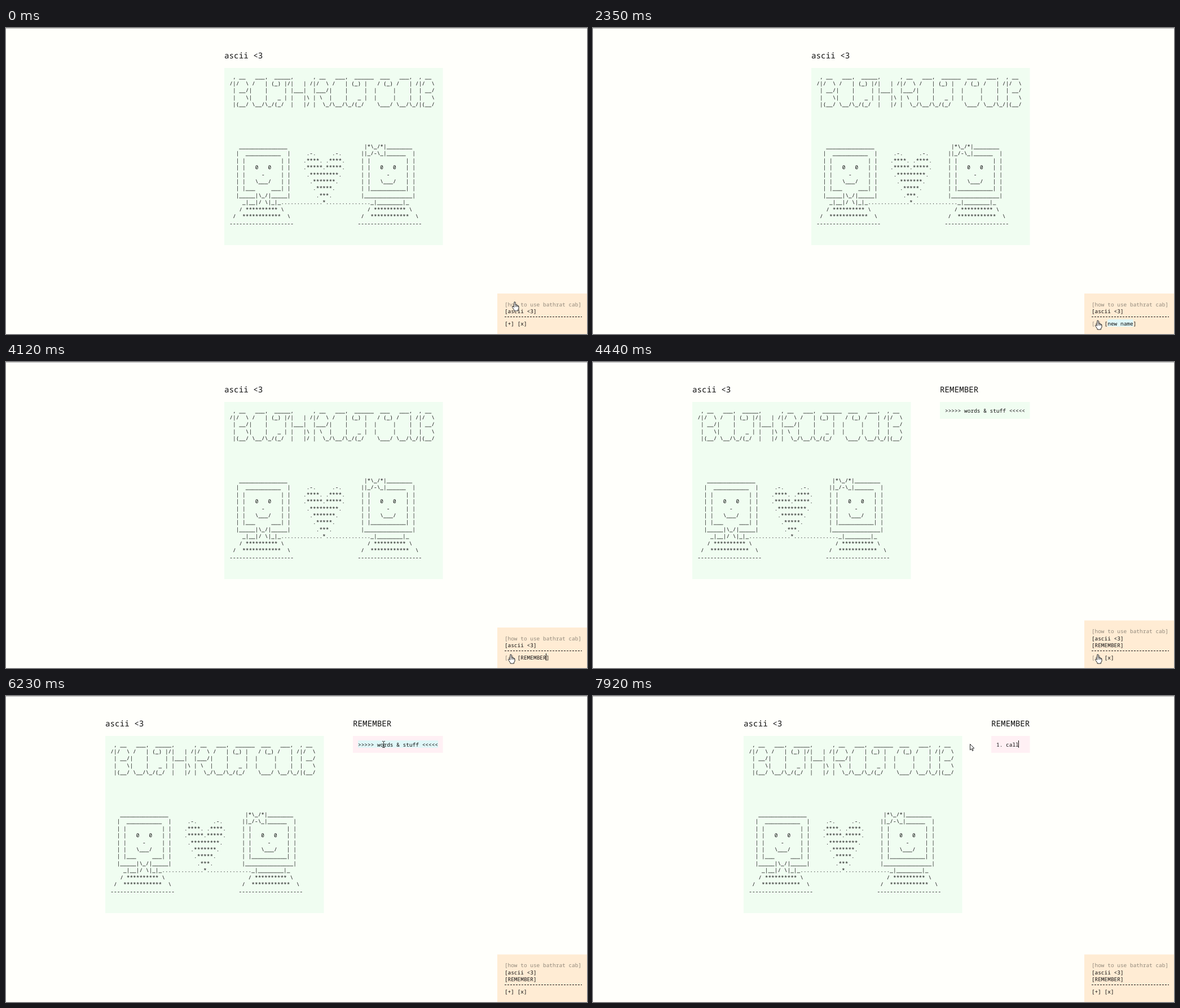
Animation, 1030 px wide and 544 px high, one loop 8000 ms. Source, as an HTML page with a canvas:

```html
<!DOCTYPE html>
<html lang="en">
<head>
<meta charset="utf-8">
<title>ascii notes</title>
<style>
html, body { margin: 0; width: 100%; height: 100%; overflow: hidden; background: #fffffb; }
canvas { display: block; }
</style>
</head>
<body>
<canvas id="stage" width="1030" height="544"></canvas>
<script>
const ctx = document.getElementById('stage').getContext('2d');
const LOOP = 8000, SIZE = 9.48, CH = 5.688, LINE = 12.43;
const FONT = '"Noto Sans Mono", "DejaVu Sans Mono", monospace';
const INK = '#111', DIM = '#938a7c', PAPER = '#fffffb', MINT = '#f0fdf1',
      BLUSH = '#fff0f4', SAND = '#ffecd4', PICKED = '#e0f7f8';

// Banner letters: five rows each, plus the step to the next letter
const LETTERS = {
  A: [7, '  ___,', ' /   |', '|    |', '|    |', ' \\__/\\_/'],
  B: [6, ' , __', '/|/  \\', ' | __/', ' |   \\', ' |(__/'],
  C: [6, '  ___', ' / (_)', '|', '|', ' \\___/'],
  H: [7, ' ,', '/|   |', ' |___|', ' |   |\\', ' |   |/'],
  R: [6, ' , __', '/|/  \\', ' |___/', ' | \\', ' |  \\_/'],
  T: [5, ' ______', '(_) |', '    |', '  _ |', ' (_/'],
  ' ': [2, '', '', '', '', '']
};

function banner(word) {
  const rows = Array.from({ length: 5 }, () => Array(66).fill(' '));
  let col = 0;
  for (const c of word) {
    const [step, ...shape] = LETTERS[c];
    shape.forEach((s, r) => [...s].forEach((g, i) => { if (g !== ' ') rows[r][col + i] = g; }));
    col += step;
  }
  return rows.map(r => r.join('').trimEnd());
}

const PICTURE = String.raw`
   _______________                        |*\_/*|________
  |  ___________  |     .-.     .-.      ||_/-\_|______  |
  | |           | |    .****. .****.     | |           | |
  | |   0   0   | |    .*****.*****.     | |   0   0   | |
  | |     -     | |     .*********.      | |     -     | |
  | |   \___/   | |      .*******.       | |   \___/   | |
  | |___     ___| |       .*****.        | |___________| |
  |_____|\_/|_____|        .***.         |_______________|
    _|__|/ \|_|_.............*.............._|________|_
   / ********** \                          / ********** \
 /  ************  \                      /  ************  \
--------------------                    --------------------`.split('\n').slice(1);
const ART = [...banner('BATHRAT CAB'), '', '', '', '', '', ...PICTURE];

const rect = (color, x, y, w, h) => { ctx.fillStyle = color; ctx.fillRect(x, y, w, h); };

function text(str, x, y, color = INK, size = SIZE) {
  ctx.font = size + 'px ' + FONT;
  ctx.fillStyle = color;
  ctx.fillText(str, x, y);
}

const caret = (x, y) => rect(INK, Math.round(x) - 1, y, 1, 13);
const typed = (str, times, t) => str.slice(0, times.filter(at => t >= at).length);

// Position along a line that advances in equal jumps from t0 to t1
function jump(t, t0, t1, steps, from, to) {
  const gap = (t1 - t0) / (steps - 1);
  const k = t < t0 ? 0 : Math.min(1, (Math.floor((t - t0) / gap + 0.001) + 1) / steps);
  return from.map((v, i) => Math.round(v + (to[i] - v) * k));
}

function outline(x, y, points) {
  ctx.beginPath();
  points.forEach(([px, py]) => ctx.lineTo(x + px, y + py));
  ctx.closePath();
  ctx.fillStyle = '#fff';
  ctx.fill();
  ctx.strokeStyle = '#222';
  ctx.lineWidth = 1;
  ctx.lineJoin = 'round';
  ctx.stroke();
}

function hand(x, y) {
  outline(x, y, [[-1, 0], [0.5, 0], [1.2, 1], [1.2, 5], [3, 5], [3.6, 6], [5.2, 6], [5.8, 7],
    [7, 7.4], [7, 12], [5.5, 14], [5.5, 16], [-1, 16], [-1, 14.5], [-4.5, 9.5], [-4.2, 8], [-2.8, 8], [-1.4, 9.5]]);
  rect('#222', x + 1, y + 5, 0.8, 4);
  rect('#222', x + 3.2, y + 6, 0.8, 3);
  rect('#222', x + 5.2, y + 7, 0.8, 2);
}

const arrow = (x, y) => outline(x + 0.5, y + 0.5,
  [[0, 0], [0, 10.5], [2.4, 8.3], [4, 12], [5.6, 11.3], [4, 7.7], [7.3, 7.4]]);

function beam(x, y) {
  rect('#333', x, y - 5, 1, 11);
  for (const dy of [-6, 5]) {
    rect('#333', x - 2, y + dy, 2, 1);
    rect('#333', x + 1, y + dy, 2, 1);
  }
}

function artNote(x) {
  text('ascii <3', x, 54, INK, 14.25);
  rect(MINT, x, 71, 387.5, 315);
  ART.forEach((row, i) => text(row, x + 9.3, 89.5 + i * LINE));
}

function sideNote(t) {
  const typing = t >= 6540, x = typing ? 706 : 615;
  text('REMEMBER', x, 54, INK, 14.25);
  rect(t >= 6000 ? BLUSH : MINT, x, 71, 774.5 - x, 30);
  if (typing) {
    const s = typed('1. call', [6540, 7000, 7310, 7540, 7690, 7840, 7920], t);
    text(s, x + 9, 89.5);
    caret(x + 9 + s.length * CH, 79);
    return;
  }
  if (t >= 6150) rect(PICKED, x + 9, 79, 25 * CH, 13);
  else if (t >= 6000) rect(PICKED, x + 9 + 6 * CH, 79, 13 * CH, 13);
  text('>>>>> words & stuff <<<<<', x + 9, 89.5);
}

function menu(t, hover) {
  const x = 883.8, added = t >= 4440, top = added ? 459.5 : 472;
  rect(SAND, 871, top, 159, 544 - top);
  text('[how to use bathrat cab]', x, top + 22.5, DIM);
  text('[ascii <3]', x, top + 35, INK);
  if (added) text('[REMEMBER]', x, 507);
  ctx.strokeStyle = INK;
  ctx.lineWidth = 1;
  ctx.setLineDash([3, 2]);
  ctx.beginPath();
  ctx.moveTo(884, 513.5);
  ctx.lineTo(1021, 513.5);
  ctx.stroke();
  ctx.setLineDash([]);
  text('[+]', x, 528.5, hover ? DIM : INK);

  const bx = x + 4 * CH, ix = bx + CH;
  if (t < 1250 || added) { text('[x]', bx, 528.5); return; }
  const name = t < 2900 ? 'new name'
    : typed('REMEMBER', [2900, 3050, 3360, 3510, 3590, 3820, 4050, 4120], t);
  if (t >= 2350 && t < 2900) rect(PICKED, ix, 518, 8 * CH, 13);
  text('[' + name + ']', bx, 528.5);
  if (t < 1800) caret(ix, 518);
  if (t >= 2900) caret(ix + name.length * CH, 518);
}

function pointer(t) {
  if (t < 5070) return hand(...jump(t, 80, 700, 9, [902, 487], [895, 520]));
  if (t < 5610) return arrow(...jump(t, 5070, 5320, 4, [895, 520], [656, 108]));
  if (t >= 6540) return arrow(668, 85);
  const [x, y] = jump(t, 5610, 5770, 3, [656, 108], [669, 86]);
  (y < 101 ? beam : arrow)(x, y);
}

function draw(t) {
  rect(PAPER, 0, 0, 1030, 544);
  rect('#b0b0ae', 0, 0, 1030, 1);
  artNote(t < 4440 ? 387 : t < 6540 ? 176 : 267);
  if (t >= 4440) sideNote(t);
  menu(t, t >= 620 && t < 5070);
  pointer(t);
}

ctx.textRendering = 'geometricPrecision';
const start = performance.now();
function tick() {
  draw((performance.now() - start) % LOOP);
  requestAnimationFrame(tick);
}
tick();
</script>
</body>
</html>
```
